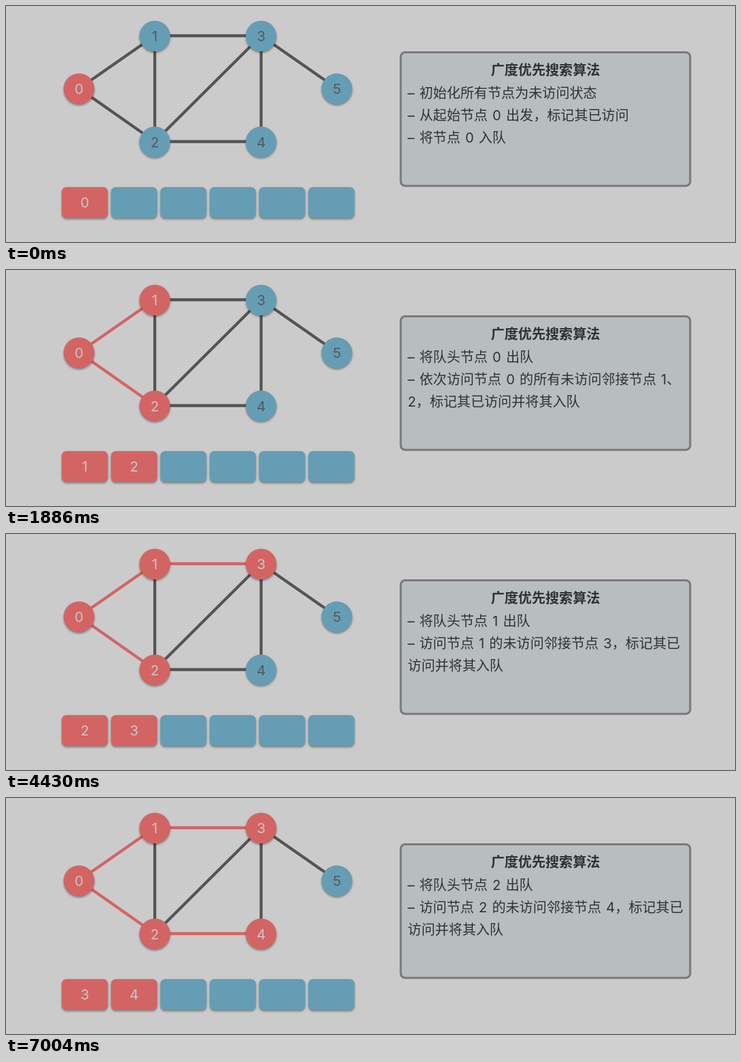
An HTML page that plays this animation: 1073x349 px, repeating every 8 s.

```html
<!DOCTYPE html>
<html lang="zh-CN">
<head>
<meta charset="utf-8">
<title>广度优先搜索</title>
<style>
html, body { margin: 0; width: 100%; height: 100%; overflow: hidden; background: #cbcbcb; }
svg { display: block; width: 1073px; height: 349px; }
text { font: 20.1px Inter, "Noto Sans CJK SC", "Noto Sans CJK", sans-serif; fill: #303132; white-space: pre; word-spacing: 1.5px; }
.title { font-weight: 700; text-anchor: middle; }
.edge { stroke: #545454; stroke-width: 4.3; }
.edge.on { stroke: #d36464; }
.shape { fill: #659db5; filter: drop-shadow(0 2px 1.5px rgba(0, 0, 0, .38)); }
.on .shape { fill: #d36464; }
.label { font-size: 20.5px; text-anchor: middle; fill: #535a5e; }
.on .label { fill: #cfc6c6; }
.panel { fill: #b8bdc0; stroke: #77797b; stroke-width: 3; }
</style>
</head>
<body>
<svg id="stage" viewBox="0 0 1073 349"></svg>
<script>
const LOOP = 8000;
const NODES = [[107.5, 122.5], [219, 44.5], [219, 201], [375.5, 44.5], [375.5, 201], [487, 122.5]];
const EDGES = ['01', '02', '12', '13', '23', '24', '34', '35'];
const STEPS = [
  { at: 0, nodes: '0', edges: [], queue: '0',
    lines: ['– 初始化所有节点为未访问状态', '– 从起始节点 0 出发，标记其已访问', '– 将节点 0 入队'] },
  { at: 500, nodes: '012', edges: ['01', '02'], queue: '12',
    lines: ['– 将队头节点 0 出队', '– 依次访问节点 0 的所有未访问邻接节点 1、', '2，标记其已访问并将其入队'] },
  { at: 2810, nodes: '0123', edges: ['01', '02', '13'], queue: '23',
    lines: ['– 将队头节点 1 出队', '– 访问节点 1 的未访问邻接节点 3，标记其已', '访问并将其入队'] },
  { at: 5510, nodes: '01234', edges: ['01', '02', '13', '24'], queue: '34',
    lines: ['– 将队头节点 2 出队', '– 访问节点 2 的未访问邻接节点 4，标记其已', '访问并将其入队'] }
];

const stage = document.getElementById('stage');

function add(tag, attrs, parent = stage) {
  const el = document.createElementNS('http://www.w3.org/2000/svg', tag);
  for (const key in attrs) el.setAttribute(key, attrs[key]);
  return parent.appendChild(el);
}

function addText(x, y, content, cls, parent) {
  const el = add('text', { x, y, class: cls }, parent);
  el.textContent = content;
  return el;
}

const edges = EDGES.map(([a, b]) => {
  const [x1, y1] = NODES[a], [x2, y2] = NODES[b];
  return add('line', { x1, y1: y1 - .5, x2, y2: y2 - .5, class: 'edge' });
});

const nodes = NODES.map(([cx, cy], i) => {
  const group = add('g', {});
  add('circle', { cx, cy, r: 22.7, class: 'shape' }, group);
  addText(cx, cy + 7.7, i, 'label', group);
  return group;
});

const slots = NODES.map((_, i) => {
  const x = 82 + i * 72.6;
  const group = add('g', {});
  add('rect', { x, y: 267.7, width: 68, height: 45.8, rx: 7, class: 'shape' }, group);
  return { group, label: addText(x + 34, 298, '', 'label', group) };
});

add('rect', { x: 581, y: 68.5, width: 426, height: 197.5, rx: 6.5, class: 'panel' });
addText(794, 101.9, '广度优先搜索算法', 'title');
const lines = [0, 1, 2].map(i => addText(591.3, 135.5 + i * 33.4, '', 'line'));

function show(step) {
  edges.forEach((el, i) => el.classList.toggle('on', step.edges.includes(EDGES[i])));
  nodes.forEach((el, i) => el.classList.toggle('on', step.nodes.includes(i)));
  slots.forEach(({ group, label }, i) => {
    label.textContent = step.queue[i] || '';
    group.classList.toggle('on', i < step.queue.length);
  });
  lines.forEach((el, i) => { el.textContent = step.lines[i]; });
}

let current;
const start = performance.now();

function tick(now) {
  const time = Math.max(0, now - start) % LOOP;
  const step = STEPS.findLast(s => s.at <= time);
  if (step !== current) show(current = step);
  requestAnimationFrame(tick);
}
tick(start);
</script>
</body>
</html>
```
